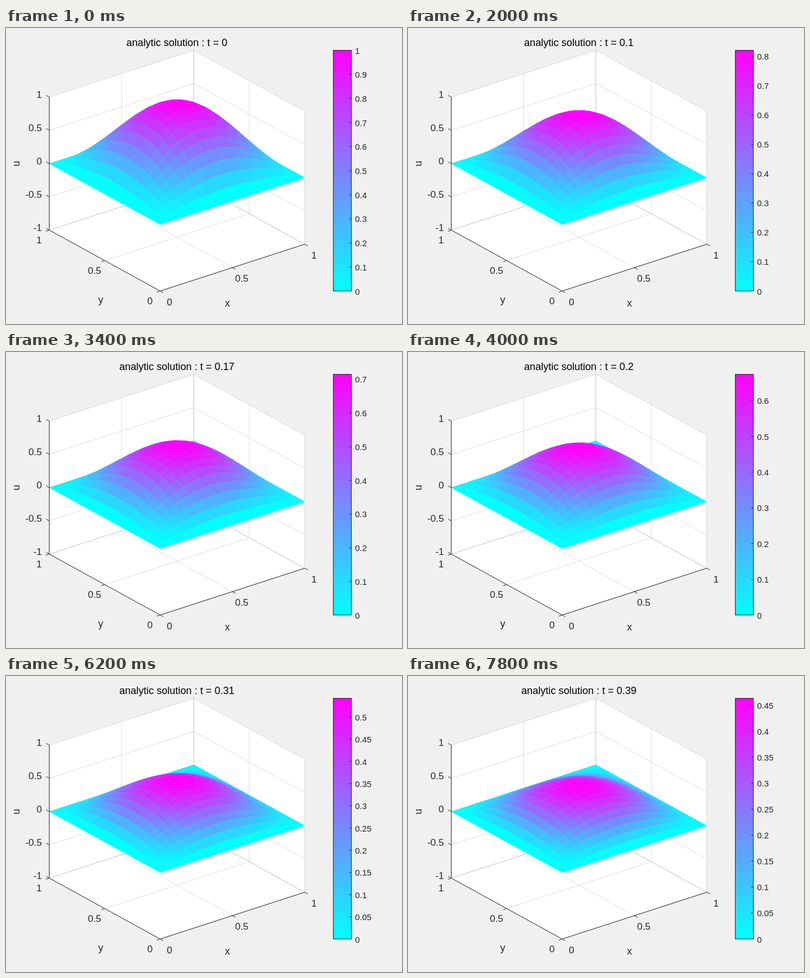
An HTML page with a canvas for the animation above (8 s loop, 700 by 525 pixels).

```html
<!DOCTYPE html>
<html lang="en">
<head>
<meta charset="utf-8">
<title>Analytic solution</title>
<style>
  html, body { margin: 0; width: 100%; height: 100%; overflow: hidden; background: #f0f0f0; }
  canvas { display: block; }
</style>
</head>
<body>
<canvas id="plot" width="700" height="525"></canvas>
<script>
const ctx = document.getElementById('plot').getContext('2d');
const FONT = '"Liberation Sans", Arial, sans-serif';
const INK = '#262626';
const GRID = 'rgba(38, 38, 38, 0.15)';
const CELLS = 20;
const STEP_MS = 200;
const STEPS = 40;
const DECAY = Math.PI ** 2 / 5;
const BAR = { x: 578.5, y: 39.5, w: 32, h: 427 };

const project = (x, y, u) => [
  272.5 + 255.5 * x - 196 * y,
  348.5 - 83 * x - 108 * y - 118 * u,
];
const mode = (x, y) => Math.sin(Math.PI * x) * Math.sin(Math.PI * y);
const cool = v => `rgb(${Math.round(255 * v)}, ${Math.round(255 * (1 - v))}, 255)`;

function trace(points) {
  ctx.beginPath();
  points.forEach(([x, y]) => ctx.lineTo(x, y));
}

function line(color, ...points) {
  trace(points);
  ctx.strokeStyle = color;
  ctx.lineWidth = 1;
  ctx.stroke();
}

function fill(color, ...points) {
  trace(points);
  ctx.closePath();
  ctx.fillStyle = color;
  ctx.fill();
}

function text(str, x, baseline, size, align = 'center', color = INK) {
  ctx.font = `${size}px ${FONT}`;
  ctx.textAlign = align;
  ctx.fillStyle = color;
  ctx.fillText(str, x, baseline);
}

function drawBox() {
  const p = project;
  fill('#fff', p(0, 0, -1), p(1, 0, -1), p(1, 0, 1), p(1, 1, 1), p(0, 1, 1), p(0, 1, -1));
  for (const s of [0, 0.5, 1]) {
    line(GRID, p(s, 0, -1), p(s, 1, -1));
    line(GRID, p(s, 1, -1), p(s, 1, 1));
    line(GRID, p(0, s, -1), p(1, s, -1));
    line(GRID, p(1, s, -1), p(1, s, 1));
  }
  for (let u = -1; u <= 1; u += 0.5) {
    line(GRID, p(0, 1, u), p(1, 1, u));
    line(GRID, p(1, 1, u), p(1, 0, u));
  }
}

function drawSurface(amplitude) {
  const corner = (i, j) => {
    const x = i / CELLS, y = j / CELLS;
    return project(x, y, amplitude * mode(x, y));
  };
  // Far cells first; each cell takes the colour of its nearest corner.
  for (let i = CELLS - 1; i >= 0; i--) {
    for (let j = CELLS - 1; j >= 0; j--) {
      const color = cool(mode(i / CELLS, j / CELLS));
      fill(color, corner(i, j), corner(i + 1, j), corner(i + 1, j + 1), corner(i, j + 1));
      ctx.strokeStyle = color;
      ctx.lineWidth = 0.6;
      ctx.stroke();
    }
  }
}

function drawAxes() {
  line(INK, project(0, 1, 1), project(0, 1, -1), project(0, 0, -1), project(1, 0, -1));
  const tick = ([x, y], dx, dy) => line(INK, [x, y], [x + dx, y + dy]);
  for (const s of [0, 0.5, 1]) {
    const px = project(s, 0, -1), py = project(0, s, -1);
    tick(px, 5.5, 3);
    tick(py, -6, 2);
    text(s, px[0] + 16.5, px[1] + 25, 17);
    text(s, py[0] - 18, py[1] + 23, 17);
  }
  for (let u = -1; u <= 1; u += 0.5) {
    const pu = project(0, 1, u);
    tick(pu, -5.5, -3);
    text(u, 63.5, pu[1] + 1, 17, 'right');
  }
  text('x', 391.5, 494, 18);
  text('y', 167.5, 488, 18);
  ctx.save();
  ctx.translate(24, 240.5);
  ctx.rotate(-Math.PI / 2);
  text('u', 0, 0, 18);
  ctx.restore();
}

function drawColorbar(max) {
  const { x, y, w, h } = BAR;
  const gradient = ctx.createLinearGradient(0, y + h, 0, y);
  gradient.addColorStop(0, cool(0));
  gradient.addColorStop(1, cool(1));
  ctx.fillStyle = gradient;
  ctx.fillRect(x, y, w, h);
  ctx.strokeStyle = INK;
  ctx.lineWidth = 1;
  ctx.strokeRect(x, y, w, h);
  const step = max < 0.55 ? 0.05 : 0.1;
  for (let n = 0; n * step <= max + 1e-9; n++) {
    const ty = y + h * (1 - n * step / max);
    line(INK, [x + w - 4, ty], [x + w, ty]);
    text(+(n * step).toFixed(2), 617, ty + 6, 15, 'left');
  }
}

function draw(now) {
  const t = Math.floor(now / STEP_MS) % STEPS / 100;
  const amplitude = Math.exp(-DECAY * t);
  ctx.fillStyle = '#f0f0f0';
  ctx.fillRect(0, 0, 700, 525);
  drawBox();
  drawSurface(amplitude);
  drawAxes();
  drawColorbar(amplitude);
  text(`analytic solution : t = ${t}`, 302, 32, 18, 'center', '#000');
}

const start = performance.now();
function frame() {
  draw(performance.now() - start);
  requestAnimationFrame(frame);
}
frame();
</script>
</body>
</html>
```
